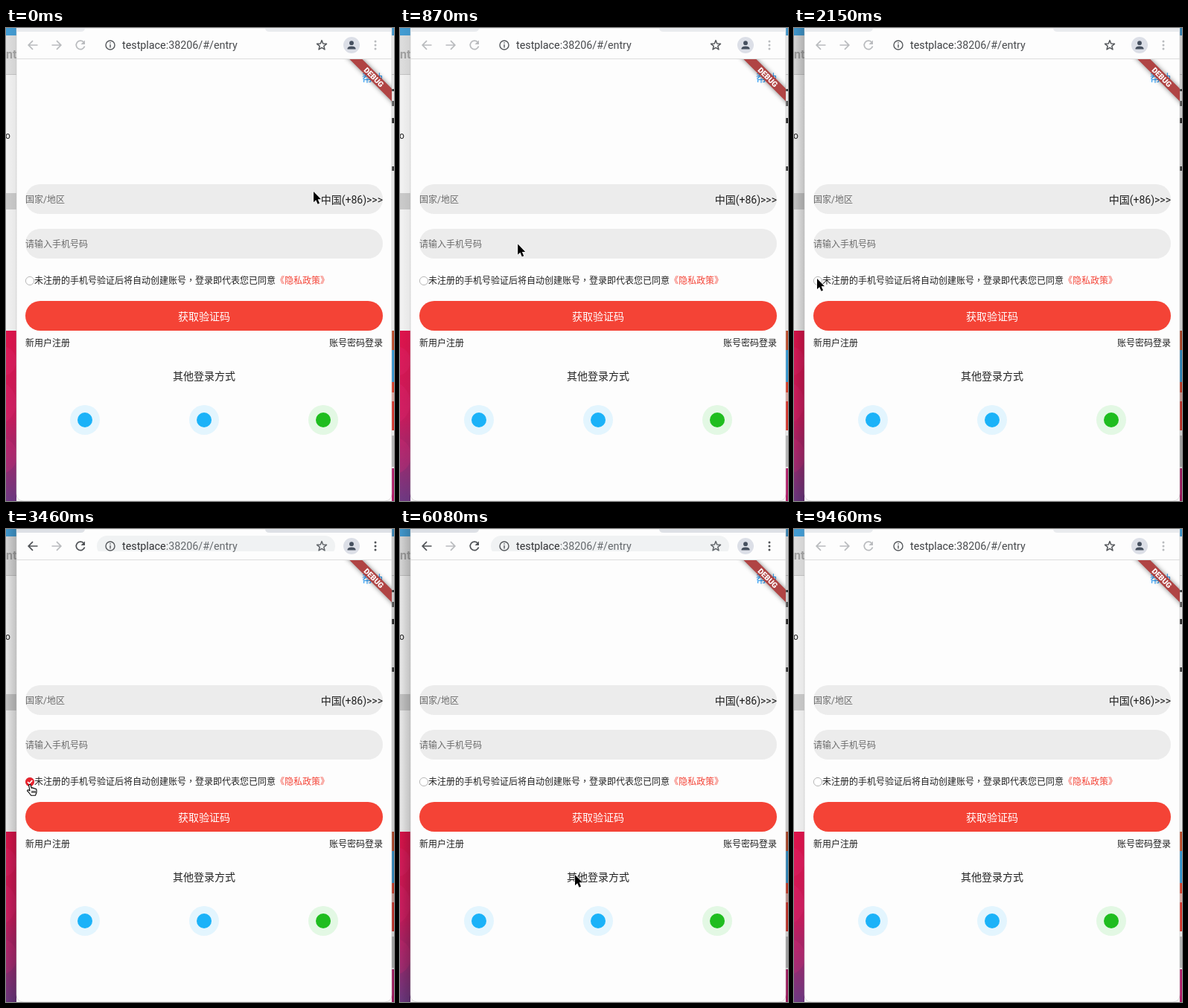
Recreate the animation shown at these times as an HTML page. Size 521 by 636 pixels, loop 9.56 s.

```html
<!DOCTYPE html>
<html lang="zh-CN">
<head>
<meta charset="utf-8">
<title>Login</title>
<style>
  html, body { margin: 0; width: 521px; height: 636px; overflow: hidden; background: #fdfdfd; }
  svg { display: block; }
  text { font-family: Roboto, "Noto Sans CJK SC", "Noto Sans CJK", sans-serif; fill: #212121; }
  .s { font-size: 12px; }
  .m { font-size: 14px; }
  .hint { fill: #6b6b6b; }
  .end { text-anchor: end; }
  .mid { text-anchor: middle; }
  .line { fill: none; stroke-width: 1.7; }
  .active { --tabs: #dee1e6; --icon: #505357; --star: #62666b; --path: #666a6e; --host: #303134; }
  .inactive { --tabs: #e9ebee; --icon: #b9bbbe; --star: #55585c; --path: #4b4d50; --host: #3c3e41; }
</style>
</head>
<body>
<svg id="stage" class="inactive" width="521" height="636" viewBox="0 0 521 636">
  <defs>
    <linearGradient id="wall" x2="0" y2="1">
      <stop stop-color="#e3144d"/><stop offset=".5" stop-color="#ce1c5f"/><stop offset="1" stop-color="#713b86"/>
    </linearGradient>
    <linearGradient id="shadeLeft">
      <stop stop-opacity=".06"/><stop offset="1" stop-opacity=".22"/>
    </linearGradient>
    <clipPath id="page"><rect x="14" y="42" width="504" height="594"/></clipPath>
    <clipPath id="barTop"><rect x="120" y="9" width="330" height="21"/></clipPath>
    <filter id="soft" x="-20%" y="-100%" width="140%" height="300%"><feGaussianBlur stdDeviation="3"/></filter>
  </defs>

  <!-- desktop behind the window -->
  <rect width="521" height="636" fill="#f7f7f7"/>
  <rect width="14" height="10" fill="#45a0d8"/>
  <rect y="10" width="14" height="52" fill="#e2e2e2"/>
  <path d="M0 62.5H14M518 62.5H521" stroke="#c8c8c8"/>
  <text x="0" y="41" font-size="16" font-weight="700" style="fill:#a5a5a5">nt</text>
  <text x="-1" y="149" class="s">o</text>
  <rect y="222" width="14" height="22" fill="#cfcfcf"/>
  <rect y="407" width="14" height="229" fill="url(#wall)"/>
  <g fill="#e8317a" fill-opacity=".22">
    <circle cx="-6" cy="448" r="20"/><circle cx="-16" cy="504" r="30"/><circle cx="-10" cy="575" r="25"/>
  </g>
  <g id="edge"></g>
  <g id="shade" opacity=".3">
    <rect width="14" height="636" fill="url(#shadeLeft)"/>
    <rect x="518" width="3" height="636" fill-opacity=".18"/>
  </g>

  <!-- browser window -->
  <path d="M14 0H518V626Q518 636 508 636H24Q14 636 14 626Z" fill="#fdfdfd" stroke="#bbb" stroke-opacity=".5"/>
  <path d="M14 0H106Q106 5 100 5H14ZM348 0H518V5H354Q348 5 348 0Z" style="fill:var(--tabs)"/>
  <rect id="pill" x="122" y="9" width="320" height="28" rx="14" fill="#f0f2f3" clip-path="url(#barTop)"/>
  <path d="M14 41.5H518" stroke="#dcdcdc"/>
  <g class="line">
    <path d="M42.5 23H30.5M36 17.2L30.2 23L36 28.8" style="stroke:var(--icon)"/>
    <path d="M61.5 23H73.5M68 17.2L73.8 23L68 28.8" stroke="#b9bbbe"/>
    <path d="M104.2 18.8A5.8 5.8 0 1 0 105.6 24.6" style="stroke:var(--icon)"/>
    <path d="M106 16.5V22H100.5Z" style="fill:var(--icon)"/>
    <circle cx="140" cy="23" r="6" stroke="#55585c" stroke-width="1.4"/>
    <path d="M140 22V26.5M140 19.3V20.8" stroke="#55585c" stroke-width="1.4"/>
    <path id="star" style="stroke:var(--star)" stroke-width="1.5" stroke-linejoin="round"/>
  </g>
  <text x="156" y="28" font-size="14.3" style="fill:var(--host)">testplace<tspan style="fill:var(--path)">:38206/#/entry</tspan></text>
  <circle cx="464" cy="23" r="11" fill="#dcdfe7"/>
  <path d="M458.5 28.5V27.5Q459 24.5 464 24.5T469.5 27.5V28.5Z" fill="#46505f"/>
  <circle cx="464" cy="20.2" r="2.9" fill="#46505f"/>
  <g style="fill:var(--icon)">
    <circle cx="496" cy="18" r="1.5"/><circle cx="496" cy="23" r="1.5"/><circle cx="496" cy="28" r="1.5"/>
  </g>

  <!-- login page -->
  <text x="506" y="72" class="m end" style="fill:#2196f3">帮助</text>
  <g clip-path="url(#page)">
    <g transform="translate(518 42) rotate(45)">
      <rect x="-50" y="28" width="100" height="12" fill-opacity=".5" filter="url(#soft)"/>
      <rect x="-50" y="28" width="100" height="12" fill="#b04444"/>
      <text x="0" y="37.7" class="mid" font-size="10.2" font-weight="900" style="fill:#fff">DEBUG</text>
    </g>
  </g>
  <rect x="26" y="210" width="480" height="40" rx="20" fill="#ececec"/>
  <text x="26" y="234.5" class="s hint">国家/地区</text>
  <text x="506" y="236" class="m end">中国(+86)&gt;&gt;&gt;</text>
  <rect x="26" y="270" width="480" height="40" rx="20" fill="#ececec"/>
  <text x="26" y="294.5" class="s hint">请输入手机号码</text>
  <circle cx="32" cy="340" r="5.6" fill="#fff" stroke="#a6a6a6" stroke-width=".8"/>
  <g id="tick">
    <circle cx="32" cy="340" r="6" fill="#e8222d"/>
    <path d="M29 340L31.3 342.3L35.2 338" class="line" stroke="#fff" stroke-width="1.3"/>
  </g>
  <text x="38" y="344.3" class="s">未注册的手机号验证后将自动创建账号<tspan lang="zh-TW" style="font-family:'Noto Sans CJK TC','Noto Sans CJK',sans-serif">，</tspan>登录即代表您已同意<tspan fill="#f44336" style="fill:#f44336">《隐私政策》</tspan></text>
  <rect x="26" y="367" width="480" height="40" rx="20" fill="#f44336"/>
  <text x="266" y="392.5" class="m mid" style="fill:#fff">获取验证码</text>
  <text x="26" y="427.7" class="s">新用户注册</text>
  <text x="506" y="427.7" class="s end">账号密码登录</text>
  <text x="266" y="472.7" class="m mid">其他登录方式</text>
  <g fill="#e3f5fe"><circle cx="106" cy="527" r="20"/><circle cx="266" cy="527" r="20"/></g>
  <circle cx="426" cy="527" r="20" fill="#e3f8e4"/>
  <g fill="#1bb2f8"><circle cx="106" cy="527" r="10"/><circle cx="266" cy="527" r="10"/></g>
  <circle cx="426" cy="527" r="10" fill="#1fbd1f"/>

  <g id="cursor" stroke-linejoin="round">
    <path id="arrow" d="M0 0V14.2L3.2 11.2L5.6 16.8L8 15.8L5.7 10.3H10Z" fill="#000" stroke="#fff" stroke-width="1.2" paint-order="stroke"/>
    <path id="hand" d="M5 10L3.6 2.4Q4.6 .4 6 2L7.2 6.4Q8.5 5.2 9.5 6.8Q10.8 5.8 11.7 7.4Q13.7 6.8 14 9V12L12.6 16.2H6.6Q4 12.5 1.6 10.2Q1.6 8.3 3.4 9Z M8 10V13M10 10V13M12 10V13" fill="#fff" stroke="#000" stroke-width="1.1"/>
  </g>
</svg>
<script>
const LOOP = 9560;
const $ = id => document.getElementById(id);
const show = (id, on) => $(id).setAttribute('visibility', on ? 'visible' : 'hidden');

// Slivers of other windows along the right edge: top, bottom, colour.
const slivers = [
  [0, 10, '#45a0d8'], [82, 85, '#444'], [98, 105, '#666'], [121, 128, '#333'], [186, 192, '#444'],
  [407, 433, '#c9532f'], [433, 476, '#38a0dc'], [476, 490, '#e2452f'], [490, 502, '#e8b0a8'],
  [502, 541, '#e03a31'], [548, 590, '#bfbfbf'], [592, 636, '#bd2272']
];
$('edge').innerHTML = slivers.map(([top, bottom, color]) =>
  `<rect x="518" y="${top}" width="3" height="${bottom - top}" fill="${color}"/>`).join('');

const starPoints = Array.from({ length: 10 }, (_, i) => {
  const r = i % 2 ? 2.9 : 6.8, a = i * Math.PI / 5 - Math.PI / 2;
  return `${424 + r * Math.cos(a)} ${23.4 + r * Math.sin(a)}`;
});
$('star').setAttribute('d', 'M' + starPoints.join('L') + 'Z');

// Pointer moves: first step, last step, step count, way points.
const moves = [
  [60, 1010, 17, [[413, 220], [340, 182], [280, 166], [222, 195], [178, 252], [157, 293], [158, 302]]],
  [1240, 1920, 13, [[158, 302], [150, 345], [105, 366], [60, 355], [31, 337]]],
  [2980, 2980, 1, [[31, 337], [27, 342]]],
  [3640, 3690, 2, [[27, 342], [27, 345], [27, 344]]],
  [4800, 4910, 3, [[27, 344], [42, 357], [56, 371], [68, 380]]],
  [5210, 5320, 3, [[68, 380], [129, 380], [205, 377], [252, 380]]],
  [5620, 6140, 10, [[252, 380], [248, 425], [238, 480], [232, 513], [235, 465], [239, 427]]],
  [6500, 6790, 6, [[239, 427], [300, 410], [372, 430], [402, 508]]],
  [6940, 7050, 3, [[402, 508], [427, 556], [456, 602], [470, 636]]]
];

function along(points, p) {
  const x = p * (points.length - 1);
  const i = Math.min(Math.floor(x), points.length - 2);
  return points[i].map((v, axis) => v + (points[i + 1][axis] - v) * (x - i));
}

function pointerAt(t) {
  const move = moves.findLast(([start]) => t >= start);
  if (!move) return moves[0][3][0];
  const [start, end, steps, points] = move;
  const done = t >= end ? steps : 1 + Math.floor((t - start) / (end - start) * (steps - 1));
  return along(points, done / steps);
}

function render(t) {
  const active = t >= 2210 && t < 9460;
  $('stage').setAttribute('class', active ? 'active' : 'inactive');
  show('pill', active);
  $('shade').setAttribute('opacity', t >= 2150 && t < 9460 ? 1 : 0.3);
  show('tick', t >= 3220 && t < 4230);

  const [x, y] = pointerAt(t);
  const hand = t >= 2980 && t < 6500 && y < 405;
  const visible = t < 7050;
  $('cursor').setAttribute('transform', `translate(${x.toFixed(1)} ${y.toFixed(1)})`);
  show('arrow', visible && !hand);
  show('hand', visible && hand);
}

const begin = performance.now();
function tick() {
  render((performance.now() - begin) % LOOP);
  requestAnimationFrame(tick);
}
tick();
</script>
</body>
</html>
```
